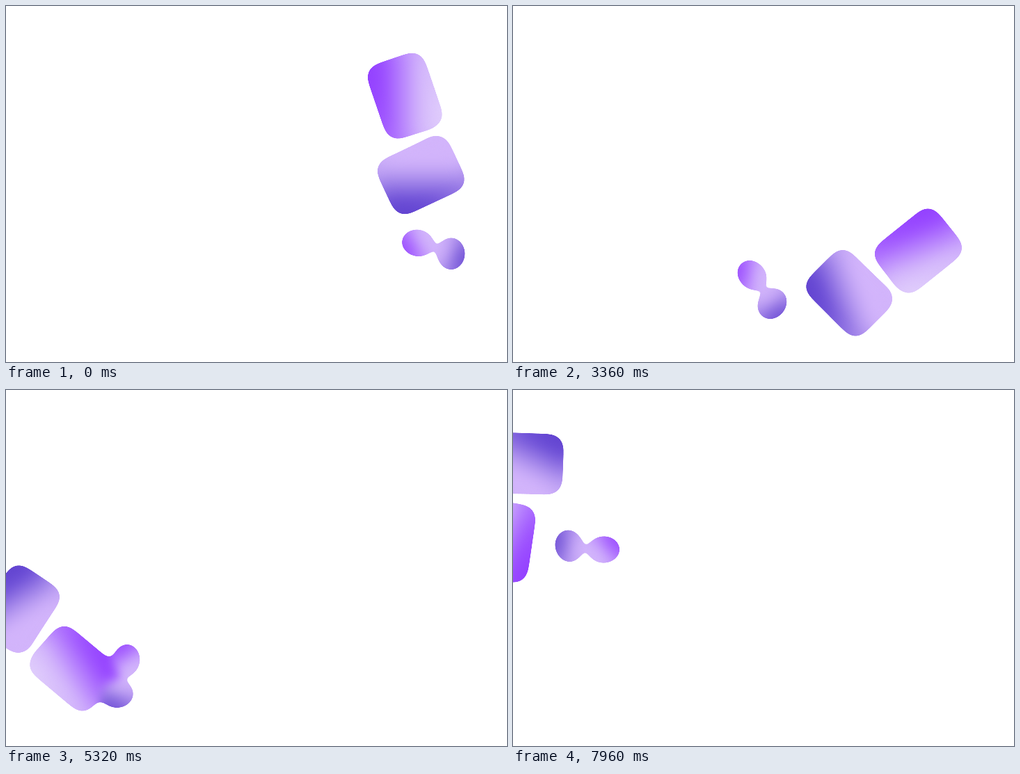
These frames come from a looping animation (720x512 px, 8 s). An HTML page:

```html
<!DOCTYPE html>
<html lang="en">
<head>
<meta charset="utf-8">
<title>Gooey cards</title>
<style>
  html, body { margin: 0; width: 100%; height: 100%; overflow: hidden; background: #fff; }
  svg { display: block; width: 100vw; height: 100vh; }
</style>
</head>
<body>
<svg viewBox="0 0 720 512">
  <defs>
    <filter id="goo" filterUnits="userSpaceOnUse" x="-160" y="-60" width="960" height="640" color-interpolation-filters="sRGB">
      <feGaussianBlur stdDeviation="8"/>
      <feColorMatrix values="1 0 0 0 0  0 1 0 0 0  0 0 1 0 0  0 0 0 36 -14.5"/>
    </filter>
    <linearGradient id="violetCard" gradientUnits="userSpaceOnUse" x1="-57" x2="57" gradientTransform="rotate(18.8)">
      <stop offset=".08" stop-color="#9340ff"/>
      <stop offset=".24" stop-color="#9c50ff"/>
      <stop offset=".68" stop-color="#d2b5fb"/>
      <stop offset="1" stop-color="#e4d4fc"/>
    </linearGradient>
    <linearGradient id="indigoCard" gradientUnits="userSpaceOnUse" x1="-60" x2="60" gradientTransform="rotate(115)">
      <stop offset=".33" stop-color="#d2b4fb"/>
      <stop offset=".48" stop-color="#ba9df2"/>
      <stop offset=".8" stop-color="#6c4ed6"/>
      <stop offset="1" stop-color="#5c3ecd"/>
    </linearGradient>
    <linearGradient id="violetDrop" gradientUnits="userSpaceOnUse" x1="-20" x2="20" gradientTransform="rotate(-40)">
      <stop offset=".05" stop-color="#9847ff"/>
      <stop offset=".7" stop-color="#d2b5fb"/>
    </linearGradient>
    <linearGradient id="indigoDrop" gradientUnits="userSpaceOnUse" x1="-20" x2="20" gradientTransform="rotate(20)">
      <stop offset=".25" stop-color="#cfb1fa"/>
      <stop offset="1" stop-color="#6243d0"/>
    </linearGradient>
  </defs>
  <g filter="url(#goo)">
    <g id="cards">
      <rect x="-42" y="-55" width="84" height="110" rx="16" fill="url(#violetCard)" transform="translate(7.5 -57.7)"/>
      <rect x="-55" y="-42" width="110" height="84" rx="16" fill="url(#indigoCard)" transform="translate(-7.5 57.7) rotate(-6.2)"/>
    </g>
    <g id="drops">
      <ellipse rx="22.9" ry="18.5" fill="url(#violetDrop)" transform="translate(-25.2 0) rotate(-8)"/>
      <ellipse rx="19.2" ry="23" fill="url(#indigoDrop)" transform="translate(25.2 0) rotate(-17.7)"/>
    </g>
  </g>
</svg>
<script>
  const LOOP = 8000, SEGMENT = 3000, STEP = 40;

  // Each pose is [x, y, rotation in degrees]; one segment lies between two poses.
  const tracks = {
    cards: [[584.8, 186.2, -18.8], [548.5, 383.2, 48.6], [-0.7, 354.9, 139.5], [-0.2, 97, 204.6]],
    drops: [[615.7, 348.5, 17.7], [364.3, 407.5, 53.3], [143.2, 413.5, 111.5], [92.8, 164.5, 211]]
  };

  // cubic-bezier(.42, 0, .58, 1), solved by bisection
  function easeInOut(x) {
    let low = 0, high = 1, s = 0.5;
    for (let i = 0; i < 24; i++) {
      s = (low + high) / 2;
      const bx = 1.26 * s * (1 - s) ** 2 + 1.74 * s * s * (1 - s) + s ** 3;
      if (bx < x) low = s; else high = s;
    }
    return s * s * (3 - 2 * s);
  }

  function draw() {
    const time = Math.floor((performance.now() % LOOP) / STEP) * STEP;
    const index = Math.floor(time / SEGMENT);
    const progress = easeInOut(time / SEGMENT - index);
    for (const [id, poses] of Object.entries(tracks)) {
      const [x, y, angle] = poses[index].map((from, i) => from + (poses[index + 1][i] - from) * progress);
      document.getElementById(id).setAttribute('transform', `translate(${x} ${y}) rotate(${angle})`);
    }
    requestAnimationFrame(draw);
  }
  draw();
</script>
</body>
</html>
```
